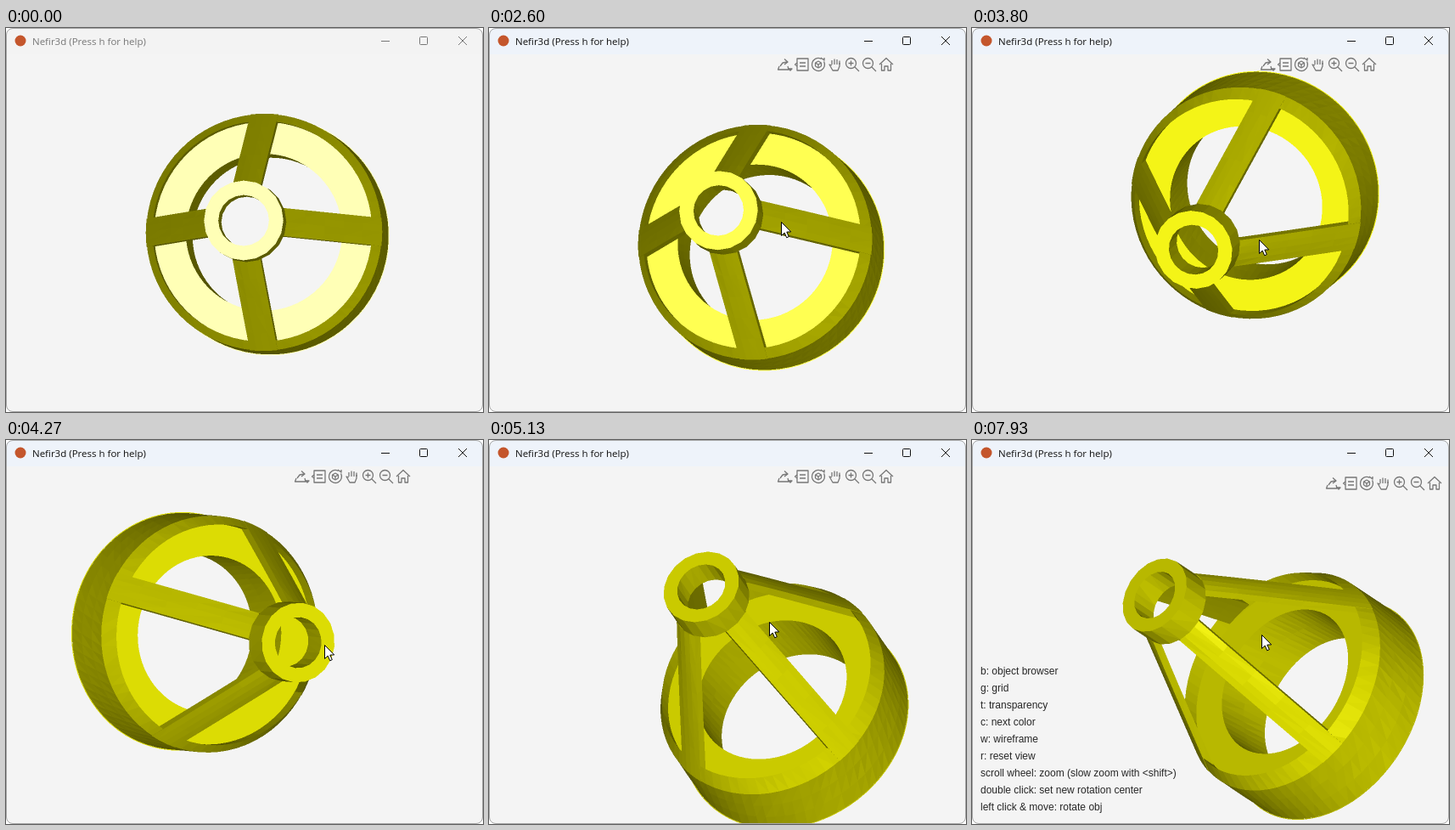
Recreate the animation shown at these times as an HTML page with a canvas. Size 562 by 452 pixels, loop 8000 ms.

```html
<!DOCTYPE html>
<html lang="en">
<head>
<meta charset="utf-8">
<title>3D viewer</title>
<style>
  html, body { margin: 0; width: 100%; height: 100%; overflow: hidden; background: #fff; }
  canvas { display: block; }
</style>
</head>
<body>
<canvas id="stage" width="562" height="452"></canvas>
<script>
const W = 562, H = 452, SS = 2, LOOP = 8000, FPS = 15, TAU = 2 * Math.PI;
const ENTER = 1200, FOCUS = 2066, ROLL_START = 3200, DRAG_END = 5600;
const BAR_MOVE = 5799, HELP_AT = 6999, LAST_MOVE = 7930;
const ctx = document.getElementById('stage').getContext('2d');

// Key points of the drag: time and where the model's axis leans
const LEAN = [
  { t: 2400, x: -.093, y: -.054 },
  { t: 2600, x: -.167, y: -.145 },
  { t: 3200, x: -.405, y: -.605 },
  { t: 3330, x: -.465, y: -.5 },
  { t: 3800, x: -.24, y: .213 },
  { t: 4400, x: .475, y: -.05 },
  { t: 4733, x: .215, y: -.43 },
  { t: 5000, x: -.2, y: -.48 },
  { t: DRAG_END, x: -.595, y: -.395 }
];

const HELP = [
  'b: object browser', 'g: grid', 't: transparency', 'c: next color',
  'w: wireframe', 'r: reset view',
  'scroll wheel: zoom (slow zoom with <shift>)',
  'double click: set new rotation center',
  'left click & move: rotate obj'
];

const clamp = v => Math.max(0, Math.min(1, v));
const mix = (a, b, f) => a + (b - a) * f;
const degrees = v => Math.asin(v) * 360 / TAU;

function slope(i, c) {
  const a = LEAN[i - 1], b = LEAN[i], d = LEAN[i + 1];
  if (!a || !d || (b[c] - a[c]) * (d[c] - b[c]) <= 0) return 0;
  return (d[c] - a[c]) / (d.t - a.t);
}

// Smooth curve through the key points, flat at turning points
function lean(t, c) {
  const end = LEAN.length - 1;
  t = Math.max(LEAN[0].t, Math.min(LEAN[end].t, t));
  let i = 0;
  while (i < end - 1 && LEAN[i + 1].t <= t) i++;
  const a = LEAN[i], b = LEAN[i + 1], h = b.t - a.t, s = (t - a.t) / h;
  const ease = s * s * (3 - 2 * s);
  return mix(a[c], b[c], ease) +
    h * s * (1 - s) * (slope(i, c) * (1 - s) - slope(i + 1, c) * s);
}

function poseAt(t) {
  const p = clamp((t - ROLL_START) / (DRAG_END - ROLL_START));
  return { x: lean(t, 'x'), y: lean(t, 'y'), roll: 50 * Math.pow(p, .87) };
}

// About one degree of tilt per pixel of drag
function pointerAt(t, pose) {
  if (t >= LAST_MOVE) return [341, 229];
  const x = 353.5 + degrees(pose.x) - .1 * pose.roll;
  const y = 236 + .95 * degrees(pose.y) + .1 * pose.roll;
  const p = 1 - clamp((t - ENTER) / 730), away = p * p * (3 - 2 * p);
  return [mix(x, 402, away), mix(y, 450, away)];
}

// ---------- mesh ----------
let seed = 11;
function rand() {
  seed = (seed * 1664525 + 1013904223) >>> 0;
  return seed / 4294967296 - .5;
}

const tris = [];
function tri(p, q, r, jitter) {
  const a = q.map((v, i) => v - p[i]), b = r.map((v, i) => v - p[i]);
  const n = [a[1] * b[2] - a[2] * b[1], a[2] * b[0] - a[0] * b[2], a[0] * b[1] - a[1] * b[0]];
  const len = Math.hypot(...n);
  if (len > 1e-6) tris.push({ pts: [p, q, r], n: n.map(v => v / len), gain: 1 + jitter * rand() });
}

// Grid of quads over a surface pt(i, j)
function patch(cols, rows, pt, jitter) {
  for (let j = 0; j < rows; j++)
    for (let i = 0; i < cols; i++) {
      const a = pt(i, j), c = pt(i + 1, j + 1);
      tri(a, pt(i + 1, j), c, jitter);
      tri(a, c, pt(i, j + 1), jitter);
    }
}

// Surface of revolution between two circles
function band(n, r0, z0, r1, z1, rows = 1, jitter = 0) {
  patch(n, rows, (i, j) => {
    const f = j / rows, r = mix(r0, r1, f), a = (i + (rows > 1 ? j / 2 : 0)) / n * TAU;
    return [r * Math.cos(a), r * Math.sin(a), mix(z0, z1, f)];
  }, jitter);
}

const BASE = 139.5, BORE = 92.5, LIP = 130, DEPTH = 85, BIG = 72, SMALL = 20;
const HUB = 47, EYE = 30, SHOULDER = 220, TOP = 258, LIP_Z = 22.6;

band(BIG, BASE, 0, BASE, -DEPTH, 3, .07);
band(BIG, BASE, -DEPTH, BASE + 1, -DEPTH);
band(BIG, BORE, 0, BORE, -DEPTH, 2, .07);
band(BIG, BORE, 0, LIP, 0);
band(BIG, LIP, 0, LIP, LIP_Z);
band(BIG, BASE, 0, LIP, LIP_Z, 1, .05);
for (const r of [HUB, EYE]) band(SMALL, r, SHOULDER, r, TOP, 1, .1);
for (const z of [TOP, SHOULDER]) band(SMALL, EYE, z, HUB, z);

function strut(angle) {
  const c = Math.cos(angle), s = Math.sin(angle);
  const half = 16.5, thick = 9, strips = 4, rows = 5;
  const at = (i, j, depth) => {
    const w = half * (2 * i / strips - 1), f = j / rows, r = mix(BASE, HUB, f) + .4;
    const x = Math.sqrt(r * r - w * w) - depth;
    return [x * c - w * s, x * s + w * c, SHOULDER * f];
  };
  for (const d of [0, thick]) patch(strips, rows, (i, j) => at(i, j, d), .03);
  for (const i of [0, strips]) patch(1, rows, (k, j) => at(i, j, k * thick), .03);
}
for (let k = 0; k < 4; k++) strut(k * TAU / 4);

// ---------- depth-buffered renderer ----------
const BW = W * SS, BH = H * SS;
const layer = document.createElement('canvas');
layer.width = BW;
layer.height = BH;
const lctx = layer.getContext('2d');
const img = lctx.createImageData(BW, BH);
const pix = new Uint32Array(img.data.buffer), depth = new Float32Array(BW * BH);

// Headlight: ambient .3, diffuse .6, specular .9 with exponent 10
function shade(d) {
  const spec = .9 * Math.pow(Math.max(0, 2 * d * d - 1), 10);
  const y = Math.min(255, Math.round(255 * (.3 + .6 * d + spec)));
  const b = Math.min(255, Math.round(255 * spec));
  return (255 << 24 | b << 16 | y << 8 | y) >>> 0;
}

function fillTri(p, q, s, color) {
  const ax = q[0] - p[0], ay = q[1] - p[1], bx = s[0] - p[0], by = s[1] - p[1];
  const area = ax * by - ay * bx;
  if (Math.abs(area) < 1e-4) return;
  const x0 = Math.max(0, Math.floor(Math.min(p[0], q[0], s[0])));
  const x1 = Math.min(BW - 1, Math.ceil(Math.max(p[0], q[0], s[0])));
  const y0 = Math.max(0, Math.floor(Math.min(p[1], q[1], s[1])));
  const y1 = Math.min(BH - 1, Math.ceil(Math.max(p[1], q[1], s[1])));
  const dq = q[2] - p[2], ds = s[2] - p[2];
  for (let y = y0; y <= y1; y++) {
    const dy = y + .5 - p[1];
    for (let x = x0; x <= x1; x++) {
      const dx = x + .5 - p[0];
      const u = (dx * by - dy * bx) / area, v = (ax * dy - ay * dx) / area;
      if (u < -1e-6 || v < -1e-6 || u + v > 1.000001) continue;
      const z = p[2] + u * dq + v * ds, k = y * BW + x;
      if (z > depth[k]) {
        depth[k] = z;
        pix[k] = color;
      }
    }
  }
}

let posed = '';
function renderModel(pose) {
  const id = JSON.stringify(pose);
  if (id === posed) return;
  posed = id;
  const ax = pose.x, ay = pose.y, az = Math.sqrt(1 - ax * ax - ay * ay), m = 1 + az;
  const u0 = [1 - ax * ax / m, -ax * ay / m, -ax], v0 = [-ax * ay / m, 1 - ay * ay / m, -ay];
  const c = Math.cos(pose.roll * TAU / 360), s = Math.sin(pose.roll * TAU / 360);
  const u = u0.map((a, i) => a * c + v0[i] * s), v = v0.map((a, i) => a * c - u0[i] * s);
  const axis = [ax, ay, az], pivot = [292, 233.5, 0], pivotZ = 129;
  const project = p => pivot.map((o, i) =>
    (o + p[0] * u[i] + p[1] * v[i] + (p[2] - pivotZ) * axis[i]) * SS);
  pix.fill(0);
  depth.fill(-1e9);
  for (const t of tris) {
    const d = Math.abs(t.n[0] * u[2] + t.n[1] * v[2] + t.n[2] * az);
    fillTri(...t.pts.map(project), shade(Math.min(1, d * t.gain)));
  }
  lctx.putImageData(img, 0, 0);
}

// ---------- window ----------
function line(...p) {
  ctx.beginPath();
  for (let i = 0; i < p.length; i += 2) ctx.lineTo(p[i], p[i + 1]);
  ctx.stroke();
}

function ring(x, y, r, from = 0, to = TAU) {
  ctx.beginPath();
  ctx.arc(x, y, r, from, to);
  ctx.stroke();
}

function titleBar(active) {
  ctx.fillStyle = active ? '#eef3fa' : '#f3f3f3';
  ctx.fillRect(0, 0, W, 31);
  ctx.fillStyle = '#c4562c';
  ctx.beginPath();
  ctx.arc(17, 15, 6.5, 0, TAU);
  ctx.fill();
  ctx.fillStyle = ctx.strokeStyle = active ? '#111' : '#777';
  ctx.font = '11.5px "Open Sans", "Noto Sans", sans-serif';
  ctx.fillText('Nefir3d (Press h for help)', 31, 20);
  ctx.lineWidth = 1;
  line(442, 15.5, 452, 15.5);
  ctx.beginPath();
  ctx.roundRect(487.5, 10.5, 9, 9, 1);
  ctx.stroke();
  line(533, 10, 543, 20);
  line(543, 10, 533, 20);
}

const icons = [
  function share() {
    line(-6, 2, -7.5, 6, 5, 6, 4, 2);
    line(-5, 2, -2, -2, 3, -3);
    line(0, -6.5, 4, -3, 0, 0);
    line(5, 5, 9, 5, 7, 7, 5, 5);
  },
  function note() {
    ctx.strokeRect(-5, -7, 13, 14);
    for (const y of [-2, 2]) line(-2, y, 5, y);
    line(-5, -2, -7.5, 0, -5, 2);
  },
  function orbit() {
    ring(0, 0, 7.5, -.5, 5.2);
    line(3, -8, 7, -5, 7, -8);
    for (let i = 0; i < 6; i++) {
      const [a, b] = [i, i + 1].map(k => k * TAU / 6 + TAU / 4);
      line(4 * Math.cos(a), 4 * Math.sin(a), 4 * Math.cos(b), 4 * Math.sin(b));
      if (i % 2 === 0) line(0, 0, 4 * Math.cos(a), 4 * Math.sin(a));
    }
  },
  function hand() {
    for (let i = 0; i < 4; i++) line(3 * i - 4, Math.abs(i - 1.4) * 1.5 - 7, 3 * i - 4, 0);
    line(-4, 1, -7, 0, -3, 7, 3, 7, 5, 2, 5, -2);
  },
  () => zoom(true),
  () => zoom(false),
  function home() {
    line(-8, 0, 0, -7.5, 8, 0);
    line(-5.5, -1, -5.5, 7, -2, 7, -2, 2, 2, 2, 2, 7, 5.5, 7, 5.5, -1);
  }
];

function zoom(plus) {
  ring(-1.5, -1.5, 6);
  line(3, 3, 8, 8);
  line(-4.5, -1.5, 1.5, -1.5);
  if (plus) line(-1.5, -4.5, -1.5, 1.5);
}

function toolbar(x, y, alpha) {
  ctx.save();
  ctx.globalAlpha = alpha;
  ctx.translate(x, y);
  ctx.strokeStyle = '#777';
  ctx.lineWidth = 1.3;
  ctx.lineJoin = 'round';
  for (const icon of icons) {
    icon();
    ctx.translate(20, 0);
  }
  ctx.restore();
}

function pointer(x, y) {
  ctx.save();
  ctx.translate(Math.round(x) + .5, Math.round(y) + .5);
  ctx.fillStyle = '#fff';
  ctx.strokeStyle = '#000';
  ctx.lineWidth = 1;
  const arrow = new Path2D('M0 0V16L3.7 12.6L6.2 18.3L8.8 17.1L6.3 11.6L11.2 11.4Z');
  ctx.fill(arrow);
  ctx.stroke(arrow);
  ctx.restore();
}

function draw(t) {
  const pose = poseAt(t);
  ctx.fillStyle = '#fff';
  ctx.fillRect(0, 0, W, H);
  ctx.save();
  ctx.beginPath();
  ctx.roundRect(0, 0, W, H, 8);
  ctx.clip();
  ctx.fillStyle = '#f4f4f4';
  ctx.fillRect(0, 0, W, H);
  titleBar(t >= FOCUS);

  renderModel(pose);
  ctx.drawImage(layer, 0, 0, W, H);

  if (t >= BAR_MOVE) toolbar(425, 51, 1);
  else toolbar(348, 43, clamp((t - ENTER) / 400));

  if (t >= HELP_AT) {
    ctx.fillStyle = '#262626';
    ctx.font = '12px "Liberation Sans", Arial, sans-serif';
    HELP.forEach((s, i) => ctx.fillText(s, 10, 276 + 20 * i));
  }
  if (t >= ENTER) pointer(...pointerAt(t, pose));
  ctx.restore();

  ctx.strokeStyle = '#a6a6a6';
  ctx.lineWidth = 1;
  ctx.beginPath();
  ctx.roundRect(.5, .5, W - 1, H - 1, 7.5);
  ctx.stroke();
}

// Poses change in steps, as in a screen recording
let shown = -1;
const start = performance.now();
function tick() {
  const t = (performance.now() - start) % LOOP;
  const step = Math.floor((t + 4) * FPS / 1000) % (LOOP * FPS / 1000);
  if (step !== shown) {
    shown = step;
    draw(step * 1000 / FPS);
  }
  requestAnimationFrame(tick);
}
tick();
</script>
</body>
</html>
```
